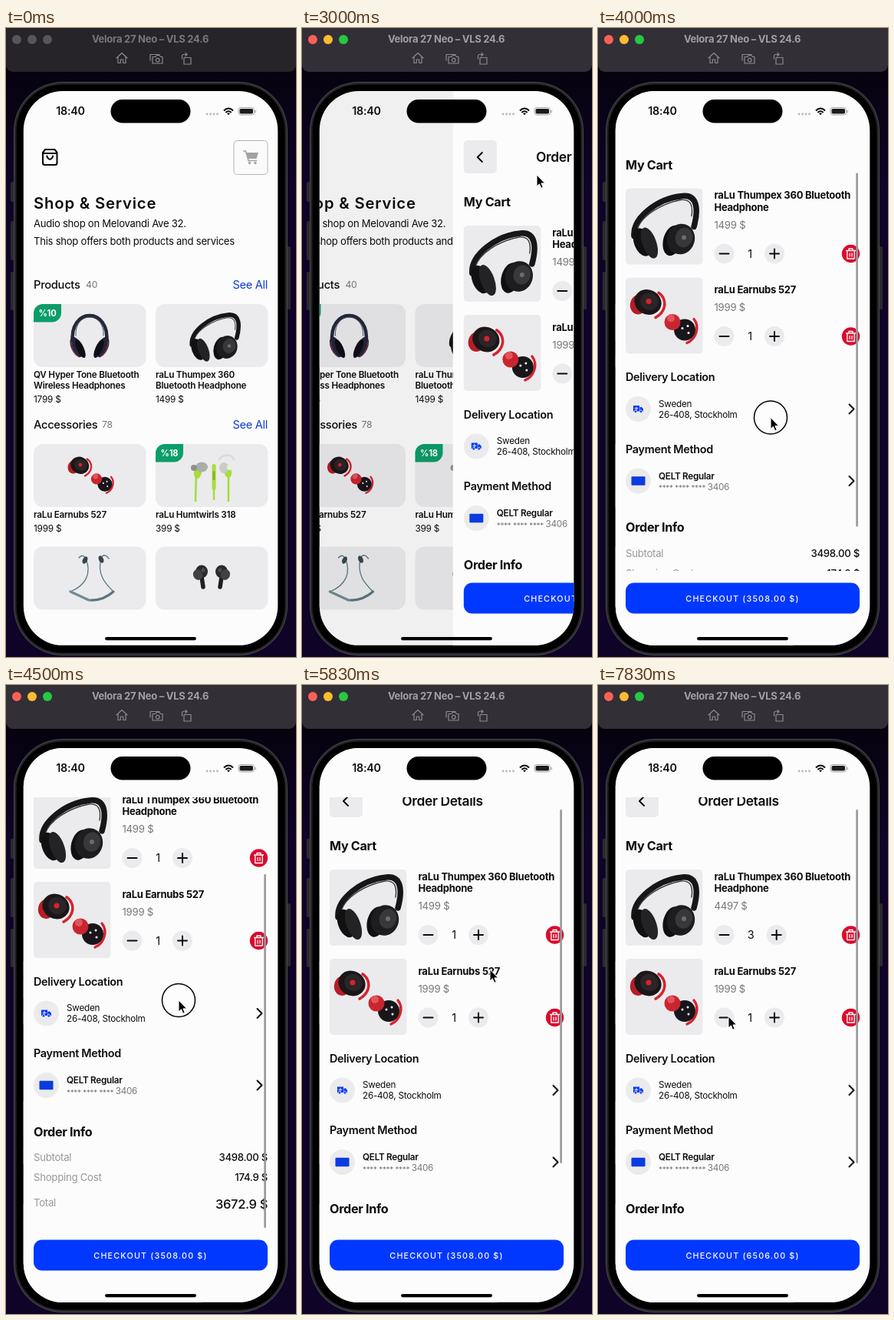
An HTML page for the animation above (8 s loop, 378 by 818 pixels).

```html
<!DOCTYPE html>
<html lang="en">
<head>
<meta charset="utf-8">
<title>Shop cart demo</title>
<style>
html, body { margin: 0; width: 100%; height: 100%; overflow: hidden; background: #0f0428; }
svg { display: block; width: 378px; height: 818px; }
text { font-family: Inter, "Open Sans", sans-serif; letter-spacing: -.02em; white-space: pre; }
.line { fill: none; stroke-linecap: round; stroke-linejoin: round; }
</style>
</head>
<body>
<svg id="stage" viewBox="0 0 378 818"></svg>
<script>
const INK = '#0c0c0e', GREY = '#77777b', PALE = '#97979d', TILE = '#ebebed', BLUE = '#0038ff';
const PAPER = '#fcfcfc', RED = '#da0a2c', LIME = '#a9dc3a', TEAL = '#5b7680', TOOL = '#8b898e';

// Drawing helpers
const text = (x, y, s, size, weight = 400, fill = INK, more = '') =>
  `<text x="${x}" y="${y}" font-size="${size}" font-weight="${weight}" fill="${fill}" ${more}>${s}</text>`;
const END = 'text-anchor="end"', MID = 'text-anchor="middle"';
const rect = (x, y, w, h, r, fill, more = '') =>
  `<rect x="${x}" y="${y}" width="${w}" height="${h}" rx="${r}" fill="${fill}" ${more}/>`;
const disc = (x, y, r, fill, more = '') => `<circle cx="${x}" cy="${y}" r="${r}" fill="${fill}" ${more}/>`;
const oval = (x, y, rx, ry, fill, turn = 0) =>
  `<ellipse rx="${rx}" ry="${ry}" fill="${fill}" transform="translate(${x} ${y}) rotate(${turn})"/>`;
const line = (d, stroke = INK, width = 2, more = '') =>
  `<path class="line" d="${d}" stroke="${stroke}" stroke-width="${width}" ${more}/>`;
const shape = (d, fill, more = '') => `<path d="${d}" fill="${fill}" ${more}/>`;
const at = (x, y, body, scale = 1, id = '') =>
  `<g ${id && `id="${id}"`} transform="translate(${x} ${y}) scale(${scale})">${body}</g>`;

// Product pictures
const overEar =
  line('M11 62C9 38 42 13 74 10C94 8 95 28 89 50', '#161617', 7.5) +
  line('M15 54C20 36 46 20 72 15C85 14 88 22 86 36', '#3a3a3d', 1.4) +
  oval(22, 70, 11, 19, '#111112', -20) + oval(31, 71, 9, 21, '#232325', -20) +
  oval(61, 68, 12, 20, '#0f0f10', 14) + oval(72, 66, 18, 20, '#1d1d1f', 18) +
  oval(76, 64, 11, 13, '#38383a', 18) + disc(76, 64, 3, '#6c6c70');

const sportBuds =
  line('M43 20C54 27 54 44 39 52', '#d6232d', 3.6, 'stroke-dasharray="4 1.5" stroke-linecap="butt"') +
  oval(17, 35, 11, 13, '#b51d27', 15) + oval(29, 32, 18, 16, '#1b1718', 25) +
  oval(31, 31, 12, 11, '#2b2527', 25) + disc(30, 31, 3.5, '#d6232d') +
  line('M89 54C97 64 92 80 80 85', '#d6232d', 3.4) + oval(77, 68, 14, 14, '#18161a') +
  disc(61, 58, 10.5, '#c9252f') + disc(59, 53, 5, '#e2545b') +
  [[74, 66], [81, 63], [82, 72]].map(([x, y]) => disc(x, y, 1.5, '#fff')).join('');

const bassPhones =
  line('M-22 10C-28-38 28-38 22 10', '#25283a', 4.5) + line('M-18 0C-20-32 20-32 18 0', '#474b60', 1) +
  [-1, 1].map(s => oval(s * 17, 15, 7, 14, '#23263a', s * 24) + oval(s * 12, 17, 4.5, 13, '#0e0f16', s * 24) +
    line(`M${s * 24} 8Q${s * 24} 20 ${s * 14} 28`, '#b3313a', .9)).join('');

const limePhones =
  line('M-20-8L-21 30M3-12V28M22-8V30', LIME, 2.6) +
  line('M10-24C14-31 27-31 29-24', '#d9dcda', 3) +
  oval(-18, -7, 5, 8, LIME, 10) + oval(-13, -14, 8, 6.5, '#aaaeab') + disc(-23, -13, 4, '#8d918d') +
  rect(.5, -18, 5, 34, 2.5, LIME) + rect(1.5, -9, 3, 12, 1.5, '#7fb51e') +
  oval(21, -9, 5, 9, LIME, -10) + oval(16, -13, 6, 7, '#c9cdc9') + disc(24, -14, 4, '#e8eee0');

const neckband =
  line('M-12-25Q-16-32-21-26M-12-25C-4-6-12 10-32 18', TEAL, 1.3) +
  line('M18-25Q12-33 8-26M8-26C2-4 14 8 24 18', TEAL, 1.3) +
  line('M-6 29Q10 30 24 18', TEAL, 3.2) + line('M-32 18L-8 29', '#728c94', 3.4) +
  oval(-13, -23, 3, 5, '#34464e', 25) + oval(8, -24, 3, 5, '#34464e', -25);

const stemBuds = [-1, 1].map(s =>
  line(`M${s * 14}-6L${s * 11} 14`, '#1f1f21', 5.5) + oval(s * 13, -6, 8, 8.5, '#2a2a2c') +
  oval(s * 18, -2, 6, 7, '#414144', s * 20) + disc(s * 11, -8, 2.6, '#4d4d50')).join('');

// Simulator window and handset
const toolbar =
  at(151, 39, line('M-7 0L0-6.5 7 0M-5-1V6.5H-1.7V2H1.7V6.5H5V-1', TOOL, 1.2)) +
  at(196, 40, line('M-8 2V-5.5H4M-5-2.5H-1L.5-4.5H4L5.5-2.5H8V6H-5Z', TOOL, 1.2) +
    disc(1.7, 1.7, 2.3, 'none', `stroke="${TOOL}" stroke-width="1.2"`)) +
  at(236, 40, line('M-4-1.5H5V7H-4ZM-6.5 0V-4Q-6.5-5.5-4.5-5.5H0M-2-7.5L0-5.5-2-3.5', TOOL, 1.2));

const windowBar = rect(0, -10, 378, 67, 9, '#272429', 'id="bar"') +
  [14, 34, 54].map(x => disc(x, 15, 6, '#57555a', 'class="lamp"')).join('') +
  text(188, 19, 'Velora 27 Neo – VLS 24.6', 13, 700, '#79777c', MID + ' id="title"') + toolbar;

const handset = [[200, 26], [251, 51], [317, 50]].map(([y, h]) => rect(6, y, 8, h, 2, '#2b2a2e')).join('') +
  rect(362, 284, 9, 82, 2, '#2b2a2e') +
  rect(10, 70, 357, 746, 64, '#47474a') + rect(11, 71, 355, 744, 63, '#262628') +
  rect(13.5, 73.5, 350, 739, 60, '#000');

const status = text(84, 113, '18:40', 14.3, 600, INK, MID) +
  rect(136.5, 93, 104, 30.5, 15.25, '#000') +
  [262, 266.5, 271, 275.5].map(x => disc(x, 112, 1.4, '#b9b9bc')).join('') +
  at(290, 112, line('M-6-4.5Q0-10.5 6-4.5M-3.6-2Q0-5.6 3.6-2', INK, 2, 'style="stroke-linecap:butt"') +
    shape('M0 1.2L-2-.8Q0-2.4 2-.8Z', INK)) +
  rect(303, 103.5, 20.5, 9.5, 3, 'none', 'stroke="#a5a5a8"') + rect(304.5, 105, 17.5, 6.5, 1.8, '#1c1c1e') +
  rect(324.6, 106.5, 1.3, 3.5, .6, '#a5a5a8') +
  rect(129, 792, 119, 4.2, 2.1, '#000');

// Shop page
const badge = (x, y, s) => at(x, y,
  shape('M0 23.5V12A12 12 0 0 1 12 0H36V11.5A12 12 0 0 1 24 23.5Z', '#0c9d69') + text(18, 15.5, s, 11.2, 700, '#fff', MID));
const card = (x, y, picture, lines = [], price = '') => rect(x, y, 146.5, 82, 12, TILE) + picture +
  lines.map((s, i) => text(x, y + 96 + 14 * i, s, 11.7, 600)).join('') +
  text(x, y + 114 + 14 * (lines.length - 1), price, 11.8);
const section = (y, name, count, x) => text(36, y, name, 14.7, 500) + text(x, y - 1, count, 12.2, 400, GREY) +
  text(341, y, 'See All', 14.6, 400, '#0b3dd2', END);

const shop = rect(22, 81, 333, 723, 0, PAPER) +
  line('M51 158H63.5L66.5 162V175.5Q66.5 178 64 178H50.5Q48 178 48 175.5V162ZM48 163H66.5M53.5 166.5V167.5Q57.2 174 61 167.5V166.5', INK, 2.1) +
  rect(297, 146.5, 44, 44, 4.5, '#fbfbfb', 'stroke="#b4b4b6"') +
  line('M309.5 160H312.5L316 172.5H326.5', '#a3a3a6', 1.6) + shape('M313.5 162H329L326.5 170H316Z', '#a3a3a6') +
  disc(317.5, 175.5, 1.7, '#a3a3a6') + disc(325, 175.5, 1.7, '#a3a3a6') +
  text(36, 234.5, 'Shop &amp; Service', 20.3, 600, INK, 'style="letter-spacing:.04em"') +
  text(36, 259, 'Audio shop on Melovandi Ave 32.', 13.1) +
  text(36, 281.5, 'This shop offers both products and services', 13.1) +
  section(338.5, 'Products', '40', 104) +
  card(36, 359, at(109, 400, bassPhones), ['QV Hyper Tone Bluetooth', 'Wireless Headphones'], '1799 $') +
  card(195, 359, at(234, 365.5, overEar, .75), ['raLu Thumpex 360', 'Bluetooth Headphone'], '1499 $') +
  badge(36, 359, '%10') +
  section(520.5, 'Accessories', '78', 125) +
  card(36, 541, at(76.5, 547, sportBuds, .68), ['raLu Earnubs 527'], '1999 $') +
  card(195, 541, at(268, 585, limePhones), ['raLu Humtwirls 318'], '399 $') +
  badge(195, 541, '%18') +
  card(36, 674.5, at(116, 715, neckband)) + card(195, 674.5, at(268, 713, stemBuds));

// Order page
const stepper = (y, n) => disc(164.5, y, 13, TILE) + line(`M158.5 ${y}h12`) +
  text(198, y + 5, '1', 14.5, 400, INK, `${MID} id="qty${n}"`) +
  at(230, y, disc(0, 0, 13, TILE) + line('M-6 0H6M0-6V6'), 1, 'plus' + n) +
  at(329.5, y, disc(0, 0, 11.7, RED) +
    line('M-6-4H6M-2.5-4V-6.5H2.5V-4M-4.7-4V6.5H4.7V-4M-1.5-.5V3.5M1.5-.5V3.5', '#fff', 1.3));
const item = (n, y, picture, lines, price, rowY) =>
  rect(36, y, 100.5, 99, 5, TILE) + at(36, y, picture) +
  lines.map((s, i) => text(151.5, rowY - 55.7 + 15.8 * (i + 1 - lines.length), s, 13, 700)).join('') +
  text(151.5, rowY - 33, price, 13.2, 400, GREY, `id="price${n}"`) + stepper(rowY, n);
const option = (y, head, icon, first, second) => text(36, y - 36.5, head, 14.4, 600) +
  disc(52.5, y, 16.5, TILE) + at(52.5, y, icon) + first + second + line(`M327.5 ${y - 6}l6 6-6 6`);
const total = (y, name, value, size, drop = 0) => text(36, y, name, 13.2, 400, PALE) +
  text(341, y + drop, value, size, 500, INK, END);

const truck = shape('M-6.5-4.5H1.5V3H-6.5ZM2-2.5H4.5L6.5 0V3H2Z', BLUE) +
  [-3.5, 3.5].map(x => disc(x, 3.3, 1.8, BLUE, `stroke="${TILE}" stroke-width=".8"`)).join('') +
  line('M-4.5-.7H-.5M-2.5-2.7V1.3', TILE, 1);

const orderList =
  rect(36, 146, 43, 43, 5, TILE) + line('M60 162l-6 6 6 6') +
  text(183, 174, 'Order Details', 17.4, 600, INK, MID) +
  text(36, 232, 'My Cart', 16.2, 700) +
  item(0, 257, overEar, ['raLu Thumpex 360 Bluetooth', 'Headphone'], '1499 $', 342) +
  item(1, 373, sportBuds, ['raLu Earnubs 527'], '1999 $', 449.5) +
  option(544, 'Delivery Location', truck, text(79, 541, 'Sweden', 11.7), text(79, 555, '26-408, Stockholm', 11.7)) +
  option(637.5, 'Payment Method', rect(-9, -5.7, 18, 11.5, 1, '#0a3be0'), text(79, 635, 'QELT Regular', 11.7, 600),
    text(79, 649, '<tspan font-size="9.8" dy="1.5">**** **** **** </tspan><tspan dy="-1.5">3406</tspan>', 11.7, 400, GREY)) +
  text(36, 703.5, 'Order Info', 16.2, 700) +
  total(736, 'Subtotal', '3498.00 $', 13.2) + total(762, 'Shopping Cost', '174.9 $', 13.2) +
  total(795, 'Total', '3672.9 $', 16.5, 2.5);

const order = rect(22, 81, 333, 723, 0, PAPER) +
  `<g clip-path="url(#list)"><g id="scroll">${orderList}</g></g>` +
  rect(336.3, 146, 2.6, 460, 1.3, '#98989b', 'id="thumb"') +
  rect(36, 721.5, 305, 40, 11, BLUE) +
  text(188.5, 745.5, '', 10.75, 500, '#fff', MID + ' id="pay" style="letter-spacing:.11em"');

const stage = document.getElementById('stage');
stage.innerHTML = `<defs>
  <linearGradient id="wall" x2="0" y2="1"><stop offset=".07" stop-color="#06020f"/>
    <stop offset=".25" stop-color="#0f0428"/><stop offset="1" stop-color="#0f0328"/></linearGradient>
  <clipPath id="screen">${rect(22.8, 82, 331.5, 720.8, 51, '#000')}</clipPath>
  <clipPath id="list">${rect(22, 146, 333, 560, 0, '#000')}</clipPath></defs>` +
  rect(0, 0, 378, 818, 0, 'url(#wall)') + windowBar + handset +
  `<g clip-path="url(#screen)"><g id="shop">${shop}</g>` + rect(22, 81, 333, 723, 0, '#000', 'id="shade"') +
  `<g id="order">${order}</g>${status}</g>` +
  at(0, 0, disc(0, 0, 21.5, '#fff', 'id="touch" fill-opacity=".35" stroke="#000" stroke-width="1.5"') +
    shape('M0 0V15L3.4 11.8 5.7 17.3 8.2 16.3 5.9 10.9H10.6Z', '#000', 'stroke="#fff" stroke-width="1"'), 1, 'pointer');

// Motion: the picture advances in steps of 1/6 s
const LOOP = 8000, RATE = 6, SLIDE = 17.4, DRAG = [22, 33], REST = 17;
const path = [[14, 279, 203], [16, 318, 168], [17, 318, 168], [20, 282, 237], [21, 250, 400], [22, 225, 555],
  [23, 225, 548], [25, 225, 465], [27, 225, 410], [28, 225, 414], [30, 225, 457], [32, 225, 523], [33, 225, 538],
  [35, 245, 370], [37, 231, 326], [42, 231, 326], [46, 170, 431], [48, 170, 431]];
const presses = [[16, 17], DRAG, [38, 38], [41, 41]];
const inside = (f, [a, b]) => f >= a && f <= b;
const clamp = (v, lo, hi) => Math.min(hi, Math.max(lo, v));
const $ = id => document.getElementById(id);
const move = (id, x, y) => $(id).setAttribute('transform', `translate(${x} ${y})`);
const show = (id, on) => $(id).style.display = on ? '' : 'none';

function pointerAt(f) {
  const i = clamp(path.findIndex(p => p[0] > f), 1, path.length - 1);
  const [a, b] = [path[i - 1], path[i]], k = clamp((f - a[0]) / (b[0] - a[0]), 0, 1);
  return [a[1] + (b[1] - a[1]) * k, a[2] + (b[2] - a[2]) * k];
}

function draw(f) {
  const active = f >= 16;
  $('bar').setAttribute('fill', active ? '#322f37' : '#272429');
  $('title').setAttribute('fill', active ? '#a19fa4' : '#79777c');
  document.querySelectorAll('.lamp').forEach((el, i) =>
    el.setAttribute('fill', active ? ['#ff5f57', '#febc2e', '#28c840'][i] : '#57555a'));

  // Critically damped push of the order page
  const s = Math.max(0, f - SLIDE) / RATE * 16, left = f > 20 ? 0 : (1 + s) * Math.exp(-s);
  move('order', 333 * left, 0);
  move('shop', -100 * (1 - left), 0);
  $('shade').setAttribute('opacity', .1 * (1 - left));

  const [x, y] = pointerAt(f);
  move('pointer', x, y);
  show('pointer', f >= path[0][0]);
  show('touch', presses.some(p => inside(f, p)));

  const offset = f < DRAG[0] ? 0 : f > DRAG[1] ? REST : clamp(555 - y, 0, 117);
  move('scroll', 0, -offset);
  move('thumb', 0, 1.7 + offset * .84);
  show('thumb', f > DRAG[0]);

  const qty = f < 39 ? 1 : f < 42 ? 2 : 3;
  $('qty0').textContent = qty;
  $('qty0').setAttribute('x', qty > 1 ? 199 : 198);
  move('plus0', qty > 1 ? 232.7 : 230, 342);
  $('price0').textContent = `${1499 * qty} $`;
  $('pay').textContent = `CHECKOUT (${(2009 + 1499 * qty).toFixed(2)} $)`;
}

const start = performance.now();
let last = -1;
function tick() {
  const t = (performance.now() - start + 5) % LOOP, f = Math.floor(t * RATE / 1000);
  if (f !== last) draw(last = f);
  requestAnimationFrame(tick);
}
tick();
</script>
</body>
</html>
```
